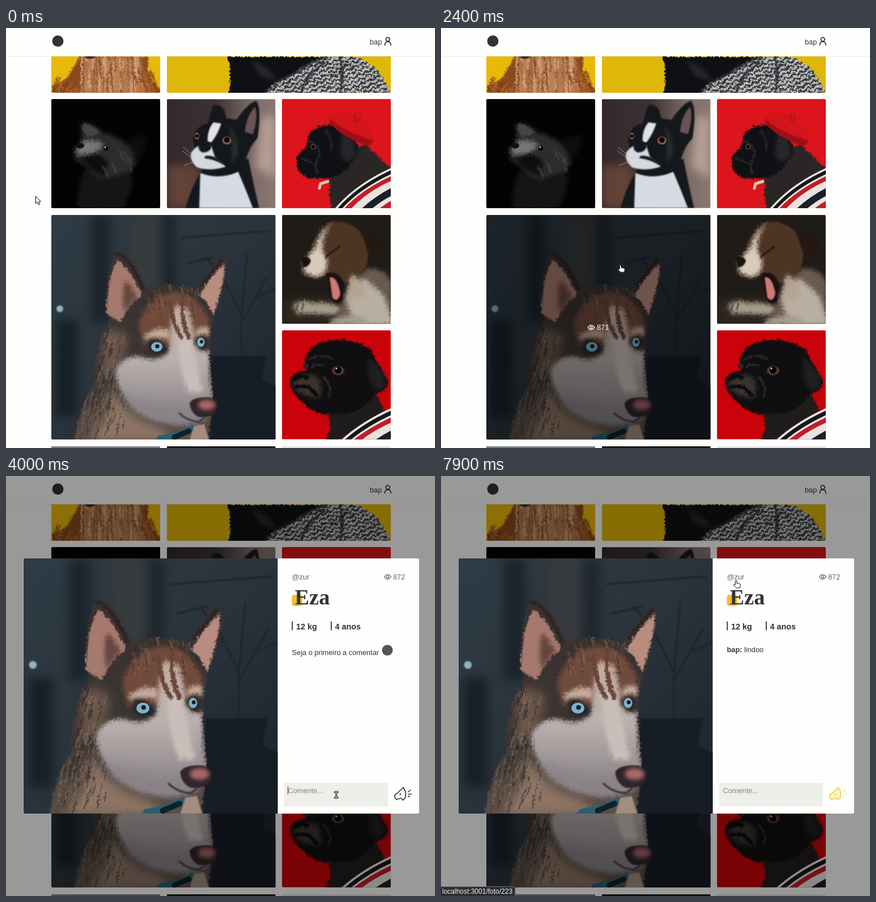
Animation of 757x739 px, one loop 8 s. Source, as an HTML page:

```html
<!DOCTYPE html>
<html lang="pt">
<head>
<meta charset="utf-8">
<title>Galeria</title>
<style>
html, body { margin: 0; width: 100%; height: 100%; overflow: hidden; background: #fefefc; }
#stage { position: absolute; left: 0; top: 0; width: 757px; height: 739px; overflow: hidden; background: #fefefc; }
#stage > svg { position: absolute; left: 0; top: 0; overflow: hidden; }
#stage > svg.photo { border-radius: 2px; }
#stage > #cursor { overflow: visible; will-change: transform; }
text { font-family: "Liberation Sans", Arial, sans-serif; font-size: 12.8px; fill: #333; white-space: pre; }
.bold { font-weight: bold; }
.big { font-weight: bold; font-size: 14.4px; }
.name { font: bold 38.4px "Liberation Serif", serif; }
.line { fill: none; stroke-linecap: round; stroke-linejoin: round; }
filter { color-interpolation-filters: sRGB; }
.soft { filter: url(#soft); }
.blend { filter: url(#blend); }
.haze { filter: url(#haze); }
.fur { filter: url(#fur); }
</style>
</head>
<body>
<div id="stage">
<svg width="0" height="0">
  <defs>
    <filter id="soft" x="-20%" y="-20%" width="140%" height="140%"><feGaussianBlur stdDeviation=".8"/></filter>
    <filter id="blend" x="-30%" y="-30%" width="160%" height="160%"><feGaussianBlur stdDeviation="3.5"/></filter>
    <filter id="haze" x="-50%" y="-50%" width="200%" height="200%"><feGaussianBlur stdDeviation="8"/></filter>
    <filter id="fur" x="-5%" y="-5%" width="110%" height="110%"><feTurbulence baseFrequency=".16" numOctaves="2" seed="4"/><feDisplacementMap in="SourceGraphic" scale="7" xChannelSelector="R" yChannelSelector="G"/></filter>
    <linearGradient id="room" x2="1" y2="1"><stop stop-color="#2f3c45"/><stop offset=".5" stop-color="#2a333b"/><stop offset="1" stop-color="#1b222b"/></linearGradient>
    <linearGradient id="coat" x2="0" y2="1"><stop stop-color="#3a3231"/><stop offset=".6" stop-color="#3a3533"/><stop offset="1" stop-color="#5d4f47"/></linearGradient>
    <linearGradient id="mask" x2="0" y2="1"><stop stop-color="#c2aa9d"/><stop offset=".45" stop-color="#bab0ae"/><stop offset="1" stop-color="#827c82"/></linearGradient>
    <linearGradient id="wall"><stop stop-color="#33282a"/><stop offset=".45" stop-color="#3c3233"/><stop offset=".78" stop-color="#7b6b67"/><stop offset="1" stop-color="#8b7771"/></linearGradient>
    <pattern id="knit" width="14" height="8" patternUnits="userSpaceOnUse" patternTransform="rotate(-24)">
      <rect width="14" height="8" fill="#5e6062"/><path d="M0 0l7 5 7-5M0 8l7 5 7-5M0-8l7 5 7-5" fill="none" stroke="#c4c5c6" stroke-width="3"/><path d="M0 4l7 5 7-5M0-4l7 5 7-5" fill="none" stroke="#292b2e" stroke-width="2"/>
    </pattern>
    <path id="body" d="M40 396Q45 340 72 300Q68 240 100 184Q88 118 112 63Q124 57 142 84L166 130Q208 112 254 130Q275 91 302 73Q310 84 304 116L285 180Q276 215 278 250L283 310L276 396Z"/>
    <clipPath id="inBody"><use href="#body"/></clipPath>
  </defs>

  <symbol id="husky" viewBox="0 0 395.5 395.5">
    <path fill="url(#room)" d="M0 0h396v396H0z"/>
    <g class="haze">
      <path fill="#1d252c" d="M70 0h36v190H70zM195 0h24v130h-24z"/>
      <path fill="#383b3d" d="M140 0h50v130h-50z"/>
      <path fill="#182026" d="M8 185h38v170H8z"/>
    </g>
    <path class="line soft" stroke="#1e262d" stroke-width="3" d="M335 250V175l-35-70M335 190l45-80M335 180l10-110M315 135l-40-60M360 145l35-15M230 40l155-12M240 85l45-10"/>
    <path class="soft" fill="#171d25" d="M284 248h96l-8 42 25 12v98H272z"/>
    <circle class="soft" cx="15" cy="165" r="6" fill="#8fb5bf"/>
    <g class="fur">
      <use href="#body" class="soft" fill="url(#coat)"/>
      <g clip-path="url(#inBody)">
        <path class="haze" fill="#8d7464" d="M106 300Q126 355 196 375L214 396H66Q104 345 106 300Z"/>
        <path class="haze" fill="#6a564a" d="M90 205Q118 190 134 216L121 272L85 280Z"/>
        <path class="blend" fill="#704b3c" d="M152 190Q172 134 222 134Q262 140 278 188L268 226L160 226Z"/>
        <g id="coatHair" class="line" stroke-width="1.8" opacity=".5"></g>
      </g>
      <path class="soft" fill="#a5796d" d="M96 172Q95 111 115 78Q133 87 159 140Q134 152 121 187Z"/>
      <path class="blend" fill="#654640" d="M128 170Q120 137 130 113L150 140Z"/>
      <path class="soft" fill="#b98c80" d="M260 140Q281 101 304 84Q304 116 284 175Q276 151 260 140Z"/>
      <path class="line soft" stroke="#2f2422" stroke-width="6" d="M113 66Q133 68 160 126M264 121L300 77"/>
      <g clip-path="url(#inBody)">
        <path class="blend" fill="url(#mask)" d="M112 268Q136 238 166 251Q196 256 206 232Q207 193 213 162Q228 153 241 167Q250 199 252 226Q266 245 277 234Q276 290 284 320Q286 352 262 363Q230 371 202 364Q152 357 126 318Q110 292 112 268Z"/>
        <path class="blend" fill="#c6ab9c" d="M161 214Q182 191 207 202L206 218Q187 208 170 222ZM252 204Q264 188 277 199L276 214Q264 203 253 214Z"/>
        <path class="haze" fill="#8a8286" d="M128 310Q180 347 250 335L246 362Q180 372 134 330Z"/>
        <path class="blend" fill="#c9beb9" d="M220 205Q240 195 247 226L266 310H240Q222 265 220 205Z"/>
      </g>
      <path class="line soft" stroke="#674438" stroke-width="7" d="M207 153Q212 187 227 213M229 147Q228 187 241 214"/>
    </g>
    <path class="blend" fill="#242528" d="M169 219Q190 211 206 241Q190 249 174 239ZM253 222Q262 208 275 215L273 235Q263 238 253 222Z"/>
    <g fill="#7bb2cc"><ellipse cx="186" cy="232" rx="10" ry="8.5"/><ellipse cx="264" cy="224" rx="6.5" ry="8"/></g>
    <g fill="#10191e"><circle cx="187" cy="231" r="3.6"/><circle cx="265" cy="223" r="3"/></g>
    <path class="soft" fill="#30252a" d="M244 331Q251 319 281 321Q297 330 290 348Q277 359 259 355Q245 347 244 331Z"/>
    <ellipse class="blend" cx="274" cy="334" rx="15" ry="9" fill="#a86868"/>
    <path class="line soft" stroke="#393135" stroke-width="3" d="M270 357L260 364Q239 362 226 349"/>
    <path class="line" stroke="#28606f" stroke-width="12" d="M192 394Q225 389 247 377"/>
    <path class="line" stroke="#11202a" stroke-width="9" d="M217 391l26-11"/>
    <path class="soft" fill="#a48d7e" d="M252 371l18-3 8 28h-34z"/>
  </symbol>

  <symbol id="shadow" viewBox="0 0 192 192">
    <path fill="#030303" d="M0 0h192v192H0z"/>
    <g class="fur">
      <path class="blend" fill="#141515" d="M58 120Q41 160 46 192H125Q152 140 135 105Z"/>
      <path class="blend" fill="#0d0d0d" d="M126 74Q149 59 167 62Q165 96 139 119Z"/>
      <path class="blend" fill="#2b2d2c" d="M51 42Q67 35 88 57Q128 65 143 96Q151 114 135 126L94 139Q76 138 66 122L41 104L38 88L51 74Z"/>
      <path class="soft" fill="#424542" d="M53 43Q67 38 84 58L62 66Q53 57 53 43Z"/>
      <path class="blend" fill="#777873" d="M55 72Q79 68 91 80L74 94L45 98L42 88Z"/>
      <path class="blend" fill="#0c0d0d" d="M48 102l30-7 20 12-5 28-24-12z"/>
      <path class="line soft" stroke="#484a49" stroke-width="2" d="M126 92q15 15 12 34M104 108l10 22M88 116l10 18M118 87l8 20"/>
    </g>
    <ellipse cx="51" cy="82" rx="7" ry="5" fill="#111"/><circle cx="96" cy="87" r="4"/><circle cx="95" cy="85" r="1.4" fill="#ddd"/>
  </symbol>

  <symbol id="boston" viewBox="0 0 192 192">
    <path fill="url(#wall)" d="M0 0h192v192H0z"/>
    <path class="haze" fill="#b59d94" d="M167 30h25v110l-35-20z"/><path class="haze" fill="#624337" d="M0 116h55v76H0z"/>
    <path class="soft" fill="#15181d" d="M33 192Q43 154 63 124L144 105Q153 151 163 192Z"/>
    <path class="soft" fill="#d6dae2" d="M59 130Q92 143 126 128Q140 160 152 192H57Z"/>
    <path class="soft" fill="#14171b" d="M72 43L81 12Q91 6 101 19L105 34L123 36Q145 5 158 3Q168 17 160 69Q146 83 139 108Q126 134 99 131L56 115L46 74Q48 48 72 43Z"/>
    <path class="soft" fill="#6d5255" d="M138 58Q140 30 156 13Q162 32 152 62Z"/>
    <path class="soft" fill="#e0e2e7" d="M82 41L96 43Q91 60 79 76L72 78Q70 56 82 41Z"/>
    <path class="soft" fill="#d5d9df" d="M49 87Q60 77 78 81L85 102L104 119Q77 128 53 120Q39 108 43 94Z"/>
    <path class="soft" fill="#14171b" d="M56 78Q67 69 79 78Q80 94 63 94Q54 91 56 78M68 100Q88 98 101 116Q84 106 66 104Z"/>
    <path class="blend" fill="#33363b" d="M108 46q16 14 16 50l-10 20q8-40-6-70"/>
    <g fill="#8f554b"><ellipse cx="106" cy="73" rx="8" ry="7"/><ellipse cx="53" cy="65" rx="4" ry="6"/></g>
    <g fill="#080b0f"><circle cx="106" cy="72" r="5"/><circle cx="53" cy="65" r="3"/></g>
    <path class="line" stroke="#bbb" stroke-width=".7" d="M49 102l-20-17M48 106L27 91M50 109l-20 8"/>
  </symbol>

  <symbol id="jersey" viewBox="0 0 104 76">
    <path fill="#17181c" d="M0 76Q36 29 104 0v76z"/>
    <g fill="none">
      <path stroke="#e9e5de" stroke-width="3.5" d="M1 77Q38 31 105 1M11 80Q45 39 107 11"/>
      <path stroke="#c41c28" stroke-width="10" d="M18 81Q51 43 110 17"/>
      <path stroke="#e7e4df" stroke-width="13" d="M30 84Q61 47 112 26"/>
      <path stroke="#1c1f29" stroke-width="13" d="M46 86Q74 56 114 37"/>
      <path stroke="#e7e4df" stroke-width="9" d="M60 86Q84 62 114 49"/>
      <path stroke="#c41c28" stroke-width="14" d="M72 90Q92 70 114 60"/>
      <path stroke="#e7e4df" stroke-width="8" d="M86 92Q98 80 114 70"/>
    </g>
  </symbol>

  <symbol id="beret" viewBox="0 0 192 192">
    <path fill="#dc151c" d="M0 0h192v192H0z"/>
    <g class="fur">
      <path class="soft" fill="#292625" d="M80 113L146 76Q167 100 192 121L105 192H89Q77 170 84 150Z"/>
      <path class="soft" fill="#101114" d="M47 57Q66 42 88 44L130 74Q138 92 124 106Q112 128 91 134Q63 142 39 136Q24 126 25 112Q20 95 39 86Z"/>
      <path class="blend" fill="#26272a" d="M104 54Q130 68 129 98Q111 117 101 98Z"/>
      <path class="line soft" stroke="#2d2e31" stroke-width="3" d="M44 72Q62 77 65 96Q52 116 61 128M32 102l20 8M76 54q11 17 9 35"/>
    </g>
    <circle cx="55" cy="84" r="5" fill="#533b35"/><circle cx="55" cy="84" r="3"/>
    <path fill="#d2141b" d="M84 30Q88 21 130 28L129 24Q135 20 139 24V34Q158 49 162 72Q159 84 146 80Q107 66 86 43Z"/>
    <path class="soft" fill="#9f0d16" d="M84 34Q111 59 161 73Q158 85 146 80Q107 66 86 43Z"/>
    <path class="line" stroke="#8e1018" stroke-width="1.5" d="M130 28q-2 7 2 11l7-5"/>
    <path class="line" stroke="#e1c6ab" stroke-width="5" d="M66 157l2-8 13-4"/>
    <use href="#jersey" x="90" y="121" width="104" height="76"/>
  </symbol>

  <symbol id="puppy" viewBox="0 0 192 192">
    <path fill="#1f1b17" d="M0 0h192v192H0z"/><path class="haze" fill="#30271f" d="M0 148h192v44H0z"/>
    <g class="fur">
      <path class="blend" fill="#695a4e" d="M108 140Q132 97 156 92Q183 96 192 116v76H81Q103 176 108 140Z"/>
      <path class="blend" fill="#b9aea2" d="M112 150Q122 118 145 110L178 140L192 176v16h-66Z"/>
      <path class="soft" fill="#4d3423" d="M50 52Q62 19 86 10Q118 7 139 31Q158 56 146 92L126 114Q112 124 101 112L78 102Q58 113 40 105Z"/>
      <path class="soft" fill="#241910" d="M139 33Q175 27 178 53Q169 78 148 61Z"/>
      <path class="blend" fill="#d8cbbb" d="M87 12Q70 29 69 59L78 80Q78 105 58 108L36 99L37 78L58 55Q64 28 87 12Z"/>
      <path class="blend" fill="#b3a493" d="M120 104Q139 106 145 140L110 154L115 124Z"/>
      <path class="blend" fill="#a69a88" d="M17 157Q31 146 53 153Q87 151 104 162L93 174Q40 172 24 172ZM83 185Q111 171 141 178l13 14H83Z"/>
    </g>
    <path class="soft" fill="#1a1210" d="M33 76Q46 69 51 81Q47 93 37 92ZM79 103Q103 97 110 124L106 152Q92 160 87 148Z"/>
    <path class="soft" fill="#cd7a76" d="M84 110Q97 107 103 138Q99 156 89 146Z"/>
    <path class="line soft" stroke="#1d1510" stroke-width="3" d="M78 73l23-17"/>
    <path class="line soft" stroke="#3a3028" stroke-width="2" d="M28 158l-3 10M38 156l-3 11"/>
  </symbol>

  <symbol id="pug" viewBox="0 0 192 192">
    <path fill="#c90309" d="M0 0h192v192H0z"/>
    <g class="fur">
      <path class="soft" fill="#1f1c1c" d="M72 131L154 89Q167 115 180 140L98 192H74Q94 164 72 131Z"/>
      <path class="soft" fill="#0f0f11" d="M38 50Q47 19 91 15Q132 15 154 32Q172 63 186 89Q181 108 163 110Q147 135 116 145L67 146Q34 132 14 101L13 82Q26 69 41 68Z"/>
      <path class="blend" fill="#201f20" d="M150 45Q180 67 181 92Q176 108 163 103Q148 87 150 45Z"/>
      <path class="blend" fill="#3a3330" d="M20 85Q37 70 60 80Q73 96 63 118Q37 116 18 100Z"/>
      <path class="line soft" stroke="#353130" stroke-width="3" d="M46 50Q68 37 87 49M50 63q10-7 21-4M72 81q15 14 9 35M24 99q22-12 41 13"/>
      <path class="line soft" stroke="#080809" stroke-width="6" d="M22 84q12-8 21-2M23 98Q46 91 59 113"/>
    </g>
    <ellipse class="soft" cx="99" cy="71" rx="11" ry="8" fill="#5b3a31"/><circle cx="99" cy="70" r="6"/><circle cx="96" cy="67" r="1.5" fill="#ddd"/>
    <circle cx="42" cy="63" r="5" fill="#312421"/>
    <use href="#jersey" x="77" y="137" width="117" height="85"/>
  </symbol>

  <symbol id="long" viewBox="0 0 192 65">
    <path fill="#e9b90a" d="M0 0h192v65H0z"/>
    <g class="fur">
      <path class="soft" fill="#8a4a1d" d="M0 65V50Q15 48 28 34L48 0h121Q164 39 192 57v8Z"/>
      <path class="blend" fill="#b98158" d="M54 0h100L166 65H50Z"/>
      <g id="longHair" class="line" stroke-width="2" opacity=".75"></g>
    </g>
    <path class="soft" fill="#27201d" d="M56 0h24Q68 10 56 0Z"/>
  </symbol>

  <symbol id="knitted" viewBox="0 0 395.5 65">
    <path fill="#dfb708" d="M0 0h396v65H0z"/>
    <path class="fur" fill="#0f1013" d="M105 0h180L217 65H107Q114 28 105 0Z"/>
    <path class="blend" fill="#25272b" d="M150 10q30 5 44 35l-30-10z"/>
    <g class="fur">
      <path fill="url(#knit)" d="M171 65Q189 42 223 29Q260 0 281 0h55Q382 24 393 65Z"/>
      <path class="line soft" stroke="#2b2d30" stroke-width="4" d="M171 65Q189 42 223 29Q260 4 281 0M235 65Q244 30 276 11M304 0q8 29 0 65"/>
    </g>
  </symbol>
</svg>

<svg class="photo" style="left:80px;top:49px" width="192" height="64.5"><use href="#long" width="192" height="65"/></svg>
<svg class="photo" style="left:284px;top:49px" width="395" height="64.5"><use href="#knitted" width="395" height="65"/></svg>
<svg class="photo" style="left:80px;top:125.4px" width="192" height="192"><use href="#shadow"/></svg>
<svg class="photo" style="left:284px;top:125.4px" width="191.6" height="192"><use href="#boston"/></svg>
<svg class="photo" style="left:487.2px;top:125.4px" width="192" height="192"><use href="#beret"/></svg>
<svg class="photo" style="left:80px;top:329px" width="395.5" height="395.2"><use href="#husky" width="395.5" height="395.5"/></svg>
<svg class="photo" style="left:487.2px;top:329px" width="192" height="191.6"><use href="#puppy"/></svg>
<svg class="photo" style="left:487.2px;top:532.4px" width="192" height="191.8"><use href="#pug"/></svg>

<svg width="757" height="739">
  <defs>
    <g id="eye" class="line" stroke-width="1.3"><path d="M-6 0Q0-8 6 0Q0 8-6 0Z"/><circle r="1.9"/></g>
    <clipPath id="card"><rect x="30.4" y="145" width="698.6" height="449" rx="3"/></clipPath>
  </defs>
  <path fill="#7e7f83" d="M80 736h192v3H80z"/><path fill="#20171a" d="M284 736h191.5v3H284z"/><path fill="#e4e4e6" d="M487.2 736h192v3h-192z"/>
  <path fill="#e8e8e5" d="M0 49h757v1H0z"/>
  <circle cx="91.5" cy="23" r="10" fill="#333"/>
  <text x="642" y="28.5">bap</text>
  <g class="line" stroke="#333" stroke-width="1.8"><circle cx="673.7" cy="20" r="3.4"/><path d="M668.4 30c0-8 10.6-8 10.6 0"/></g>

  <g id="hovers"></g>
  <path id="dim" d="M0 0h757v739H0z" opacity=".4"/>
  <g id="loader">
    <circle cx="380.5" cy="332" r="39" fill="#fff" opacity=".5"/>
    <path class="line" stroke="#333" stroke-width="2.4" d="M369 329.5H387A4 4 0 1 1 391.5 332A4 4 0 1 1 387 334.5H369A4 4 0 1 1 364.5 332A4 4 0 1 1 369 329.5Z"/>
  </g>
</svg>

<svg width="757" height="739">
  <g id="modal">
    <g clip-path="url(#card)">
      <path fill="#fefefc" d="M30 145h700v450H30z"/>
      <use href="#husky" x="30.4" y="145" width="449" height="449"/>
    </g>
    <text x="504.5" y="182" fill-opacity=".75">@zur</text>
    <use href="#eye" x="673.5" y="177.5" stroke="#777"/>
    <text x="683" y="182" fill-opacity=".75">872</text>
    <rect x="504.5" y="209" width="18.5" height="19.5" rx="4" fill="#f6be2a"/>
    <text class="name" x="509.5" y="226">Eza</text>
    <path fill="#333" d="M504.3 256h1.8v15.5h-1.8zM573 256h1.8v15.5H573z"/>
    <text class="big" x="512" y="270">12 kg</text><text class="big" x="580.5" y="270">4 anos</text>
    <g id="empty"><text x="504.5" y="315">Seja o primeiro a comentar</text><circle cx="673" cy="306.5" r="9.5" fill="#555"/></g>
    <text id="comment" x="504.5" y="309.5"><tspan class="bold">bap:</tspan> lindoo</text>
    <rect x="491" y="540" width="182.5" height="41.5" fill="#eeeeea"/>
    <g id="focus"><rect x="488.5" y="536.7" width="188" height="48" rx="3" fill="#fea"/><rect x="490.7" y="539" width="183.5" height="43.2" fill="#fefefc" stroke="#f2c222" stroke-width="1.6"/></g>
    <text id="field" x="497.4" y="557.5"></text>
    <path id="caret" fill="#333" d="M0 546h1v14.5H0z"/>
    <g id="bark" class="line" stroke-width="1.6">
      <path d="M686 561.5Q692 557 697 552L701 548L705 555.5V565L700.5 570.5L697.5 567L688.5 569Q685.5 566 686 561.5Z"/>
      <circle cx="695.8" cy="560" r=".6"/>
      <path class="ray" d="M709.5 556l4.3-3.5"/><path class="ray" d="M710 559.7h5.3"/><path class="ray" d="M709.5 563l2.8 1.5"/>
    </g>
  </g>
  <g id="status"><path fill="#2d2e31" stroke="#777" d="M-1 722.5H127q4 0 4 4V740H-1z"/><text x="2" y="735" style="font-size:12px;fill:#eee">localhost:3001/foto/223</text></g>
</svg>

<svg id="cursor" width="20" height="20" fill="#fff" stroke="#000" stroke-linejoin="round">
  <path id="arrow" d="M.5.5V13.5L3.4 10.8L5.5 15.5L7.7 14.5L5.6 10H9.5Z"/>
  <path id="hand" d="M-.8 1Q.7-.3 2 1V5.2L7.5 6.2Q8.7 6.5 8.4 8.5L7.6 13.2H.8L-4 8.2Q-3.3 6.3-.8 8Z"/>
  <g id="beam" class="line"><path stroke-width="3" d="M-2.5-5h5M0-5V5M-2.5 5h5"/><path stroke="#fff" d="M-2.5-5h5M0-5V5M-2.5 5h5"/></g>
</svg>
</div>
<script>
const $ = id => document.getElementById(id);
const ramp = (t, a, d = 200) => Math.min(1, Math.max(0, (t - a) / d));
const show = (id, on) => $(id).style.display = on ? "" : "none";

let seed = 7;
const rnd = () => (seed = seed * 16807 % 2147483647) / 2147483647;

// Scatters short strands of each colour over a box.
function hair(id, n, x, y, w, h, dx, dy, colors) {
  $(id).innerHTML += colors.map(c => {
    let d = "";
    for (let i = 0; i < n; i++) {
      const k = .5 + rnd();
      d += `M${x + rnd() * w} ${y + rnd() * h}q${dx * k * rnd()} ${dy * k / 2} ${dx * k} ${dy * k}`;
    }
    return `<path d="${d}" stroke="${c}"/>`;
  }).join("");
}
hair("longHair", 30, 48, -10, 105, 55, 1, 28, ["#7a4420", "#dcae88", "#a9683a"]);
hair("longHair", 14, 8, 35, 40, 25, -9, 18, ["#6a3513", "#b76a2c"]);
hair("longHair", 14, 145, 15, 35, 40, 7, 20, ["#6a3513", "#b76a2c"]);
hair("coatHair", 75, 55, 195, 75, 180, -5, 18, ["#231f20", "#957b69"]);
hair("coatHair", 35, 160, 122, 110, 60, -2, -11, ["#302622", "#936a55"]);

// x, y, size, views, enter, leave
const hovers = [
  [80, 125.4, 192, 8934, 670, 1120],
  [284, 125.4, 191.6, 1859, 1160, 1790],
  [80, 329, 395.3, 871, 1800, 2740],
];
$("hovers").innerHTML = hovers.map(([x, y, s, n]) => {
  const cx = x + s / 2, cy = y + s / 2, w = String(n).length * 7.1 + 16;
  return `<g><rect x="${x}" y="${y}" width="${s}" height="${s}" rx="2" opacity=".4"/>
    <use href="#eye" x="${cx - w / 2 + 6}" y="${cy + .3}" stroke="#fff"/>
    <text x="${cx - w / 2 + 16}" y="${cy + 4.5}" style="fill:#fff">${n}</text></g>`;
}).join("");
const layers = [...$("hovers").children];
const rays = document.querySelectorAll(".ray");

// time, x, y
const path = [
  [0, 52, 295.5], [560, 52, 295.5], [900, 170, 255], [1050, 170, 255], [1300, 316, 233.5],
  [1600, 318, 255], [1900, 329, 388], [2220, 329, 388], [2400, 316, 416.5], [2720, 315.5, 416.5],
  [3480, 553, 577], [3820, 553, 577], [4150, 605, 549], [6020, 605, 549],
  [6500, 700, 560], [7050, 700, 560], [7750, 520, 183.5], [8000, 520, 183.5],
];
// time, kind
const kinds = [[0, "arrow"], [670, "hand"], [2650, "arrow"], [3690, "beam"], [6370, "arrow"], [6440, "hand"], [7150, "arrow"], [7680, "hand"]];
const keys = [4900, 5100, 5200, 5300, 5500, 5600];

function moveCursor(t) {
  const i = path.findIndex(p => p[0] > t);
  const [t0, x0, y0] = path[i - 1], [t1, x1, y1] = path[i];
  const k = (t - t0) / (t1 - t0), e = k * k * (3 - 2 * k);
  $("cursor").style.transform = `translate(${x0 + (x1 - x0) * e}px, ${y0 + (y1 - y0) * e}px)`;
  const kind = kinds.filter(c => c[0] <= t).pop()[1];
  for (const id of ["arrow", "hand", "beam"]) show(id, id === kind);
}

function drawField(t) {
  const sent = t >= 6980;
  const typed = sent ? "" : "lindoo".slice(0, keys.filter(k => k <= t).length);
  const field = $("field"), label = typed || "Comente...";
  if (field.textContent !== label) field.textContent = label;
  field.style.fill = typed ? "#333" : "#888";
  $("focus").style.opacity = ramp(t, 4000) - ramp(t, 6600);
  const since = t - (keys.filter(k => k <= t).pop() || 4000);
  show("caret", t >= 4000 && t < 6600 && since % 1000 < 500);
  $("caret").setAttribute("transform", `translate(${typed ? 497.4 + field.getComputedTextLength() : 497})`);
  show("empty", !sent);
  show("comment", sent);
}

function draw(t) {
  layers.forEach((g, i) => g.style.opacity = ramp(t, hovers[i][4]) - ramp(t, hovers[i][5]));
  show("dim", t >= 2650);
  show("loader", t >= 2650 && t < 3525);
  const s = 1 - (1 - ramp(t, 3525)) ** 2;
  show("modal", s > 0);
  $("modal").style.opacity = s;
  $("modal").setAttribute("transform", `translate(379.7 369.5) scale(${s}) translate(-379.7 -369.5)`);
  drawField(t);
  const lit = t >= 6440;
  $("bark").style.stroke = lit ? "#edcb42" : "#333";
  $("bark").style.fill = lit ? "#fff3c4" : "none";
  rays.forEach(r => r.style.opacity = lit ? (t - 6440) % 600 / 600 : 1);
  show("status", t >= 7720);
  moveCursor(t);
}

const start = performance.now();
function tick() {
  draw((performance.now() - start) % 8000);
  requestAnimationFrame(tick);
}
tick();
</script>
</body>
</html>
```
